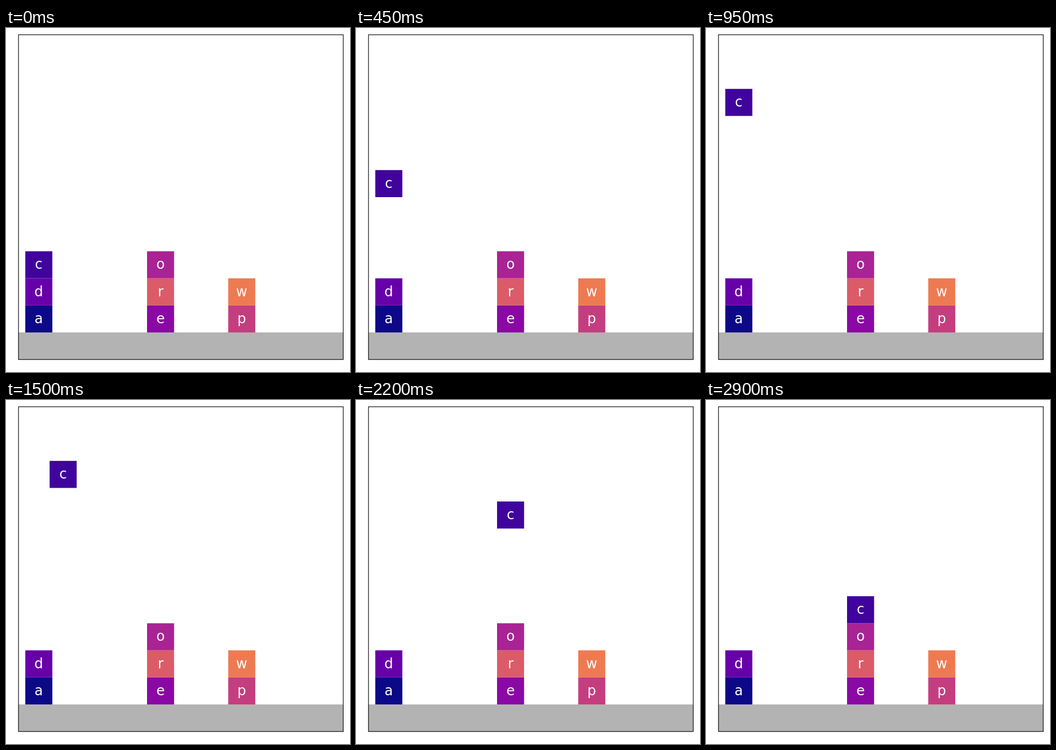
Write an HTML page that moves like this. It is 600 px wide and 600 px high and loops after 2950 ms.

```html
<!DOCTYPE html>
<html lang="en">
<head>
<meta charset="utf-8">
<title>Stacking blocks</title>
<style>
  html, body { margin: 0; width: 100%; height: 100%; overflow: hidden; background: #fff; }
  svg { display: block; width: 100%; height: 100%; }
  text { font: 24px "DejaVu Sans", sans-serif; fill: #fff; text-anchor: middle; }
</style>
</head>
<body>
<svg id="stage" viewBox="0 0 600 600"></svg>
<script>
const UNIT = 47.2, LEFT = 21.8, FLOOR = 531;
const LOOP = 2950, STEP = 50;
const stage = document.getElementById('stage');

function add(parent, tag, attrs) {
  const el = document.createElementNS('http://www.w3.org/2000/svg', tag);
  for (const key in attrs) el.setAttribute(key, attrs[key]);
  return parent.appendChild(el);
}

// Columns and levels are counted in block units from the lower left.
function place(block, col, level) {
  const x = LEFT + col * UNIT, y = FLOOR - (level + 1) * UNIT;
  block.setAttribute('transform', `translate(${x.toFixed(2)} ${y.toFixed(2)})`);
}

function addBlock(letter, fill, col, level) {
  const block = add(stage, 'g', {});
  add(block, 'rect', { width: UNIT, height: UNIT, fill });
  add(block, 'text', { x: UNIT / 2, y: UNIT / 2 + 7.4 }).textContent = letter;
  place(block, col, level);
  return block;
}

add(stage, 'rect', { x: LEFT, y: FLOOR, width: 12 * UNIT, height: UNIT, fill: '#b3b3b3' });
addBlock('a', '#0d0887', 0.25, 0);
addBlock('d', '#6700a8', 0.25, 1);
addBlock('e', '#8a09a5', 4.75, 0);
addBlock('r', '#db5c68', 4.75, 1);
addBlock('o', '#a92395', 4.75, 2);
addBlock('p', '#c43e7f', 7.75, 0);
addBlock('w', '#ee7a52', 7.75, 1);
const mover = addBlock('c', '#40049d', 0.25, 2);
add(stage, 'rect', {
  x: LEFT, y: FLOOR - 11 * UNIT, width: 12 * UNIT, height: 12 * UNIT,
  fill: 'none', stroke: '#000', 'stroke-width': 1.1
});

const ramp = (n, start, count) => Math.min(1, Math.max(0, (n - start) / count));

// Lift, carry and lower in even steps; lift and carry skip their first step.
function draw(ms) {
  const n = Math.floor((ms % LOOP) / STEP);
  const lift = n < 1 ? 0 : ramp(n, -1, 20);
  const carry = n < 30 ? 0 : ramp(n, 28, 10);
  const lower = ramp(n, 38, 20);
  place(mover, 0.25 + 4.5 * carry, 2 + 6 * lift - 5 * lower);
}

function tick() {
  draw(performance.now());
  requestAnimationFrame(tick);
}
draw(0);
requestAnimationFrame(tick);
</script>
</body>
</html>
```
